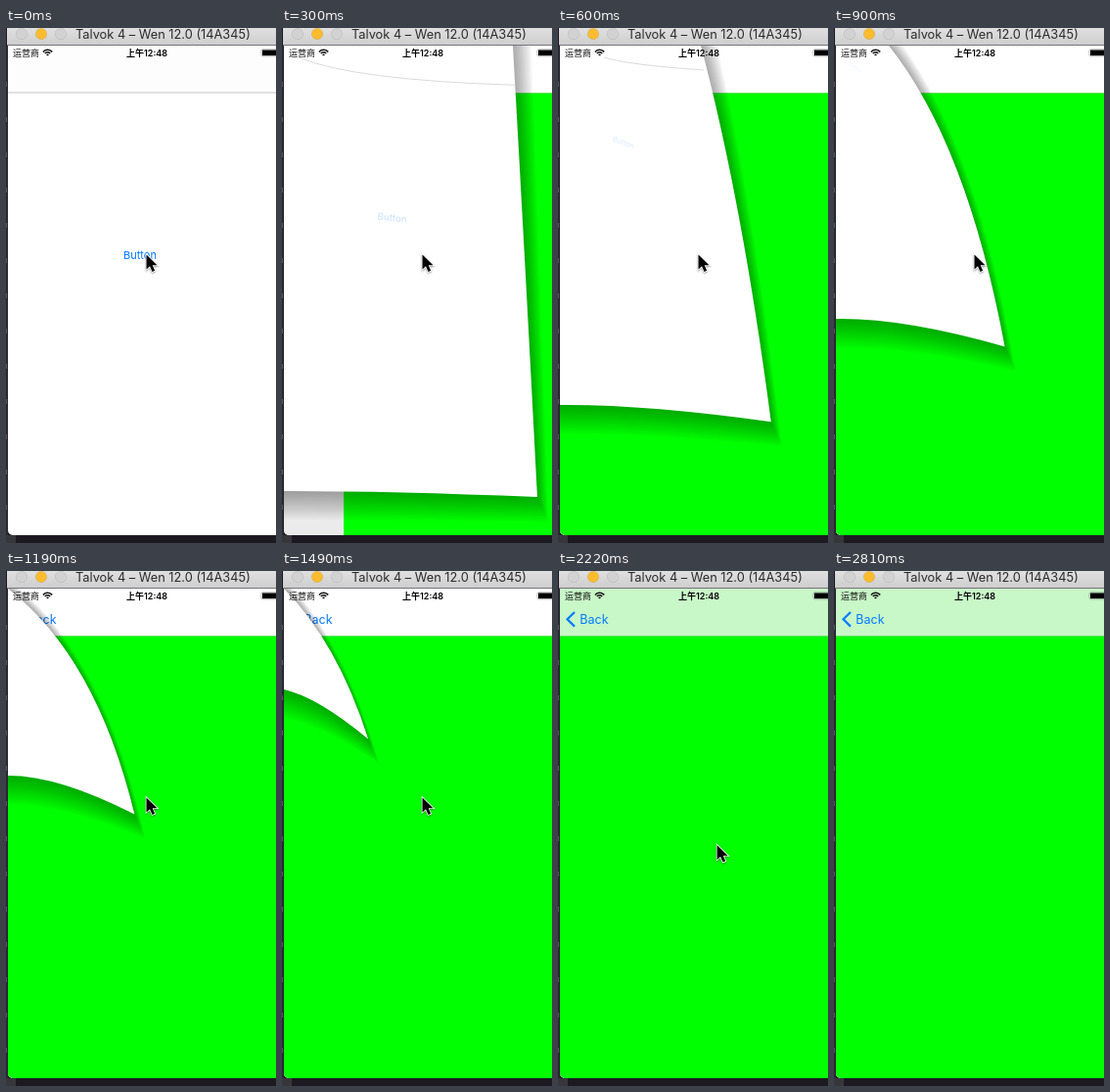
Recreate the animation shown at these times as an HTML page with a canvas. Size 276x526 px, loop 3260 ms.

```html
<!DOCTYPE html>
<html>
<head>
<meta charset="utf-8">
<style>
  html, body { margin: 0; width: 100%; height: 100%; overflow: hidden; }
  canvas { display: block; }
</style>
</head>
<body>
<canvas id="stage" width="276" height="526"></canvas>
<script>
const ctx = document.getElementById('stage').getContext('2d');
const LOOP = 3260, STEP_MS = 147.7;
// Steps at which the turned page is gone, and the pointer has left.
const TURNED = 15, POINTER_GONE = 19;
const TURN_STEPS = 13.08;
const LEFT = 2, TOP = 18, BAR_BOTTOM = 66, BOTTOM = 518, WIDTH = 274;
const FONT = 'Inter, "Noto Sans CJK SC", "Noto Sans CJK", sans-serif';
const BLUE = '#007aff';

const mix = (a, b, u) => a + (b - a) * u;

function rect(color, x, y, w, h) {
  ctx.fillStyle = color;
  ctx.fillRect(x, y, w, h);
}

function text(str, x, y, size, color, weight = 400, align = 'left') {
  ctx.font = `${weight} ${size}px ${FONT}`;
  ctx.textAlign = align;
  ctx.fillStyle = color;
  ctx.fillText(str, x, y);
}

function polyline(points, close) {
  ctx.beginPath();
  points.forEach(([x, y]) => ctx.lineTo(x, y));
  if (close) ctx.closePath();
}

function stroke(color, width) {
  ctx.strokeStyle = color;
  ctx.lineWidth = width;
  ctx.stroke();
}

function drawDesktop() {
  rect('#1c1a20', 0, 0, 276, 526);
  rect('#2b2731', 0, TOP, LEFT, 500);
  for (let y = 55; y < 510; y += 36) rect('#56515e', 0, y, 1, 5);
  rect('#37363b', 0, BOTTOM, 10, 8);
}

function drawTitleBar() {
  const shade = ctx.createLinearGradient(0, 0, 0, 17);
  shade.addColorStop(0, '#e0e0e0');
  shade.addColorStop(1, '#cecece');
  rect(shade, 1, 0, 275, 17);
  rect('#77747a', 1, 17, 275, 1);
  ['#d2d2d2', '#fdbc2e', '#d2d2d2'].forEach((color, i) => {
    ctx.beginPath();
    ctx.arc(16 + 20 * i, 6, 5.7, 0, 7);
    ctx.fillStyle = color;
    ctx.fill();
    stroke('rgba(0,0,0,.1)', .8);
  });
  text('Talvok 4 – Wen 12.0 (14A345)', 71, 11, 12.8, '#2b2b2b');
}

function drawStatusBar() {
  text('运营商', 7, 28.7, 9, '#111', 500);
  text('上午12:48', 144, 28.7, 9, '#000', 600, 'center');
  for (let r = 1.2; r < 7; r += 2.5) {
    ctx.beginPath();
    ctx.arc(42.5, 28.5, r, -Math.PI * .77, -Math.PI * .23);
    stroke('#111', 1.5);
  }
  ctx.beginPath();
  ctx.roundRect(261, 21.8, 20, 7, 1.5);
  stroke('#888', .6);
  rect('#000', 262, 22.5, 14, 5.6);
}

function drawBack() {
  polyline([[17, 42], [9.5, 49.3], [17, 56.6]]);
  stroke(BLUE, 2.2);
  text('Back', 22.3, 53.8, 12.5, BLUE);
}

function drawLabel(x, y, angle, scale, alpha) {
  ctx.save();
  ctx.translate(x, y);
  ctx.rotate(angle);
  ctx.scale(scale, scale);
  ctx.globalAlpha = alpha;
  text('Button', 0, 4, 11, BLUE, 400, 'center');
  ctx.restore();
}

const pageTop = k => Math.max(LEFT, 281 - 45 * k);

// The free corner runs to the top left while both edges bow; spread 0..1 pushes
// the outline outwards to form the shadow.
function tracePage(k, spread) {
  const p = k / TURN_STEPS;
  const bow = .2 * Math.sin(Math.PI * p) ** 2;
  const sag = 1.9 * p ** 6 - .05;
  const topX = pageTop(k) + mix(20, 6, p) * spread;
  const leftY = Math.max(TOP, 517 - 44 * k) + 29 * spread;
  const tipX = 282.6 - 21.6 * k + 11 * spread;
  const tipY = 517.4 - 38.4 * k + 25 * spread;
  ctx.beginPath();
  ctx.moveTo(LEFT, leftY);
  ctx.quadraticCurveTo(mix(LEFT, tipX, .4), mix(leftY, tipY, sag), tipX, tipY);
  ctx.quadraticCurveTo(mix(topX, tipX, .5 + bow), mix(TOP, tipY, .5 - bow), topX, TOP);
  ctx.lineTo(LEFT, TOP);
  ctx.closePath();
}

function drawBentHairline(k) {
  const x = 2 + 15 * k, endX = pageTop(k) + 3, endY = BAR_BOTTOM - 7.7 * k;
  ctx.beginPath();
  ctx.moveTo(x, Math.max(30, BAR_BOTTOM - 36 * k));
  ctx.quadraticCurveTo(mix(x, endX, .25), endY - 5, endX, endY);
  stroke('#d0d0d0', .8);
}

function drawTurningPage(k) {
  const layers = 14, p = k / TURN_STEPS;
  ctx.fillStyle = 'rgba(0,0,0,.028)';
  for (let i = layers; i > 0; i--) {
    tracePage(k, i / layers);
    ctx.fill();
  }
  ctx.save();
  tracePage(k, 0);
  ctx.fillStyle = '#fff';
  ctx.fill();
  ctx.clip();
  if (p < .3) drawBentHairline(k);
  if (p < .5) {
    drawLabel(135.5 - 22.8 * k, 232 - 38.4 * k, 1.5 * p, 1 - 1.4 * p, .26 - .5 * p);
  }
  ctx.restore();
}

function drawFirstView() {
  rect('#fdfdfd', LEFT, TOP, WIDTH, BAR_BOTTOM - TOP);
  rect('#c4c4c4', LEFT, 65.5, WIDTH, 1);
  drawLabel(137, 232, 0, 1, 1);
}

function drawSecondView(k, turned) {
  const slide = Math.round(Math.min(281, 61 * 8 ** (1 - k)) - .5);
  rect('#ebebeb', LEFT, BAR_BOTTOM, WIDTH, BOTTOM - BAR_BOTTOM);
  rect('#0f0', LEFT + Math.max(0, slide), BAR_BOTTOM, WIDTH, BOTTOM - BAR_BOTTOM);
  rect('rgba(200,200,200,.5)', LEFT, BAR_BOTTOM, WIDTH, 1);
  if (turned) rect('#c8f7c8', LEFT, TOP, WIDTH, BAR_BOTTOM - TOP);
  drawBack();
  if (!turned) drawTurningPage(k);
}

function drawScreen(step) {
  ctx.save();
  ctx.beginPath();
  ctx.roundRect(LEFT, TOP, 290, 500, [0, 0, 0, 5]);
  ctx.clip();
  rect('#fff', LEFT, TOP, WIDTH, 500);
  if (step === 0) drawFirstView();
  else drawSecondView(step - 1, step >= TURNED);
  drawStatusBar();
  ctx.restore();
}

function drawPointer(step) {
  if (step >= POINTER_GONE) return;
  const since = step - TURNED + 1;
  const moved = since > 0 ? 1 / (1 + Math.exp(4.05 - 2.45 * since)) : 0;
  ctx.save();
  ctx.translate(mix(143.5, 257, moved), mix(231.5, 520, moved));
  polyline([[0, 0], [0, 15], [3.5, 11.7], [6, 17.4], [8.6, 16.3],
    [6.2, 10.8], [11, 10.8]], true);
  ctx.shadowColor = 'rgba(0,0,0,.4)';
  ctx.shadowBlur = 2;
  ctx.shadowOffsetY = 1;
  stroke('#fff', 1.6);
  ctx.shadowColor = 'transparent';
  ctx.fillStyle = '#000';
  ctx.fill();
  ctx.restore();
}

function frame(now) {
  const step = Math.floor(now % LOOP / STEP_MS);
  drawDesktop();
  drawTitleBar();
  drawScreen(step);
  drawPointer(step);
  requestAnimationFrame(frame);
}
requestAnimationFrame(frame);
</script>
</body>
</html>
```
